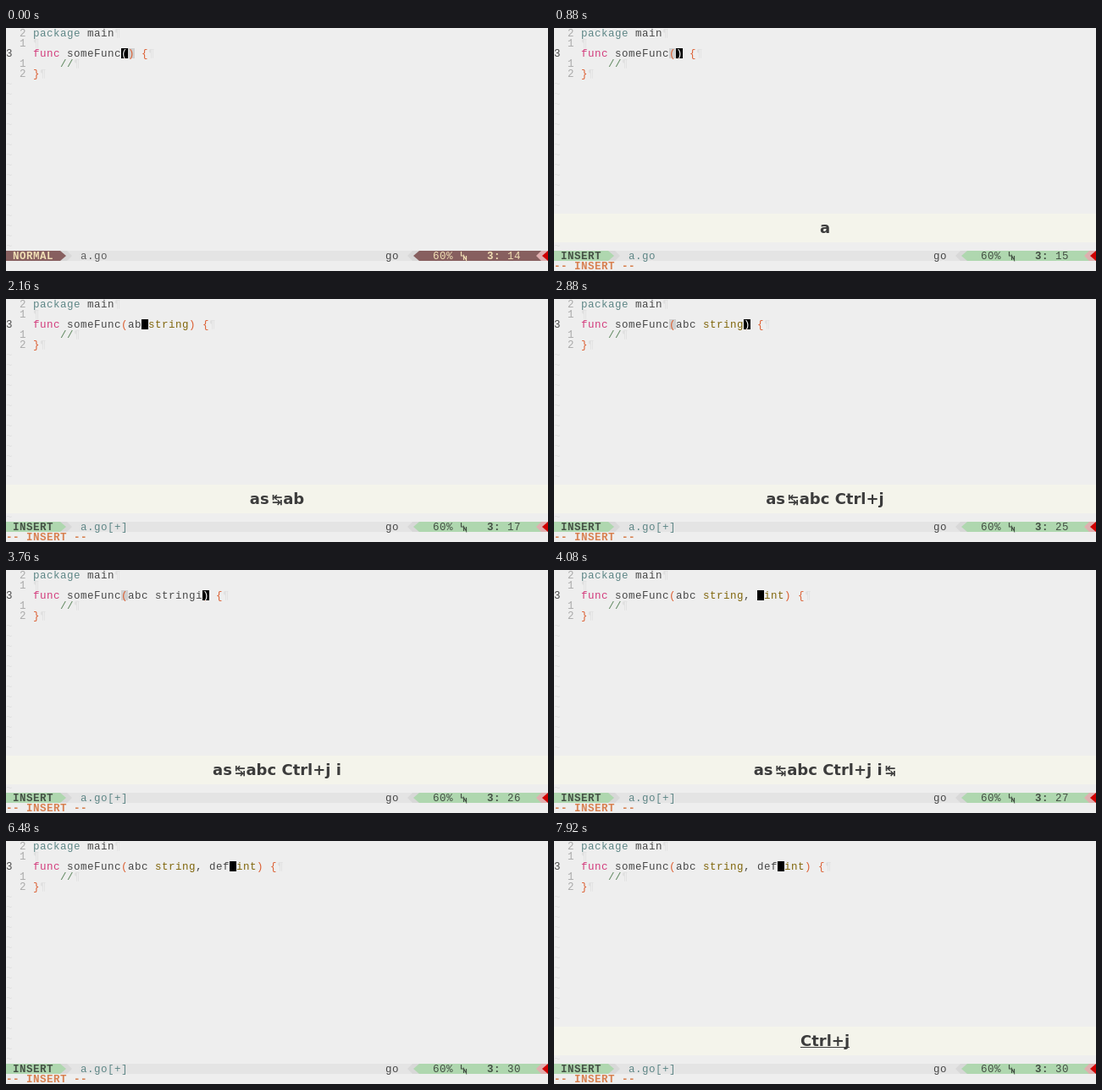
Recreate the animation shown at these times as an HTML page. Size 640 by 288 pixels, loop 8 s.

```html
<!DOCTYPE html>
<html lang="en">
<head>
<meta charset="utf-8">
<title>Go snippets in the editor</title>
<style>
html, body { margin: 0; width: 100%; height: 100%; overflow: hidden; background: #eee; }
#stage { position: relative; width: 640px; height: 288px; overflow: hidden; }
svg { position: absolute; inset: 0; display: block; }
text { font: 12.5px "Liberation Mono", monospace; letter-spacing: .499px; white-space: pre; }
.b { font-weight: bold; }
#keys {
  position: absolute; left: 0; top: 220px; width: 640px; height: 34px;
  background: #f4f4eb; color: #3c3c3c; text-align: center; white-space: pre;
  font: bold 18px/34px "DejaVu Sans", sans-serif;
}
#keys u { text-decoration: underline 1px; text-underline-offset: 1px; text-decoration-skip-ink: none; }
#keys i { font-style: normal; font-size: 15px; line-height: 1; padding: 0 1px 0 3px; }
</style>
</head>
<body>
<div id="stage">
  <svg id="screen" width="640" height="288" viewBox="0 0 640 288"></svg>
  <div id="keys"></div>
</div>
<script>
const LOOP = 8000, CW = 8, CH = 12, LEFT = 32;

// time, arguments, cursor column, mode (N normal, I insert, - insert without message), keys ("|" starts the underline)
const steps = [
  [0, '', 14, 'N', ''],
  [720, '', 15, 'I', '|a'],
  [880, '', 15, 'I', 'a'],
  [1280, 's', 16, 'I', 'a|s'],
  [1440, 's', 16, 'I', 'as'],
  [1520, ' string', 15, '-', 'as|↹'],
  [1600, ' string', 15, 'I', 'as↹'],
  [1840, 'a string', 16, 'I', 'as↹|a'],
  [2000, 'ab string', 17, 'I', 'as↹a|b'],
  [2160, 'ab string', 17, 'I', 'as↹ab'],
  [2240, 'abc string', 18, 'I', 'as↹ab|c'],
  [2400, 'abc string', 18, 'I', 'as↹abc'],
  [2720, 'abc string', 18, 'I', 'as↹abc |Ctrl+j'],
  [2800, 'abc string', 25, 'I', 'as↹abc |Ctrl+j'],
  [2880, 'abc string', 25, 'I', 'as↹abc Ctrl+j'],
  [3600, 'abc stringi', 26, 'I', 'as↹abc Ctrl+j |i'],
  [3760, 'abc stringi', 26, 'I', 'as↹abc Ctrl+j i'],
  [3840, 'abc stringi', 26, '-', 'as↹abc Ctrl+j i|↹'],
  [3920, 'abc string,  int', 27, '-', 'as↹abc Ctrl+j i|↹'],
  [4000, 'abc string,  int', 27, 'I', 'as↹abc Ctrl+j i|↹'],
  [4080, 'abc string,  int', 27, 'I', 'as↹abc Ctrl+j i↹'],
  [4240, 'abc string, d int', 28, 'I', 'as↹abc Ctrl+j i↹|d'],
  [4400, 'abc string, de int', 29, 'I', 'as↹abc Ctrl+j i↹d|e'],
  [4480, 'abc string, def int', 30, 'I', 'as↹abc Ctrl+j i↹de|f'],
  [4640, 'abc string, def int', 30, 'I', 'as↹abc Ctrl+j i↹def'],
  [6480, 'abc string, def int', 30, 'I', ''],
  [7920, 'abc string, def int', 30, 'I', '|Ctrl+j']
];

const C = {
  text: '#484848', keyword: '#d33d7d', pkg: '#5f8787', type: '#80660c', brace: '#dc5f32',
  comment: '#5f875f', num: '#aaa', faint: '#e0e0e0', match: '#d0d0d0', bar: '#e4e4e4', sep: '#d8d8d8'
};
const themes = {
  N: { bg: '#875f5f', fg: '#f0deb4', file: '#5f5f5f' },
  I: { bg: '#afd7af', fg: '#445044', file: '#5f8787' }
};

const screen = document.getElementById('screen');
const keyBand = document.getElementById('keys');

const rect = (x, y, w, h, fill) => `<rect x="${x}" y="${y}" width="${w}" height="${h}" fill="${fill}"/>`;
const cell = (col, fill) => rect(LEFT + (col - 1) * CW, 2 * CH, CW, CH, fill);
const span = ([s, fill]) => `<tspan fill="${fill}">${s}</tspan>`;
const text = (x, row, parts, cls = '') =>
  `<text class="${cls}" x="${x}" y="${row * CH + 10}">${parts.map(span).join('')}</text>`;
const arrow = (base, tip, fill) => `<path d="M${base} 264L${tip} 270L${base} 276z" fill="${fill}"/>`;
const eol = ['¶', C.faint];

function codeRows(args, col) {
  const line = `func someFunc(${args}) {`;
  const close = 15 + args.length;
  const words = args.split(/\b(string|int)\b/).map((s, i) => [s, i % 2 ? C.type : C.text]);
  let out = '';
  if ([14, 15, close].includes(col)) out += cell(14, C.match) + cell(close, C.match);
  out += text(16, 0, [['2', C.num]]) + text(16, 1, [['1', C.num]]) + text(0, 2, [['3', '#505050']]);
  out += text(16, 3, [['1', C.num]]) + text(16, 4, [['2', C.num]]);
  out += text(LEFT, 0, [['package', C.pkg], [' main', C.text], eol]) + text(LEFT, 1, [eol]);
  out += text(LEFT, 2, [['func', C.keyword], [' someFunc', C.text], ['(', C.brace],
    ...words, [') {', C.brace], eol]);
  out += text(LEFT, 3, [['    //', C.comment], eol]) + text(LEFT, 4, [['}', C.brace], eol]);
  for (let row = 5; row < 22; row++) out += text(0, row, [['~', C.faint]]);
  return out + cell(col, '#000') + text(LEFT + (col - 1) * CW, 2, [[line[col - 1], '#fff']]);
}

function statusRow(args, col, mode) {
  const normal = mode === 'N';
  const { bg, fg, file } = themes[normal ? 'N' : 'I'];
  let out = rect(0, 264, 640, 12, C.bar);
  out += rect(64, 264, 8, 12, C.sep) + arrow(72, 78, C.sep) + rect(0, 264, 64, 12, bg) + arrow(64, 71, bg);
  out += rect(480, 264, 8, 12, C.sep) + arrow(480, 474, C.sep) + rect(488, 264, 144, 12, bg) + arrow(488, 481, bg);
  out += rect(632, 264, 8, 12, '#dfafaf') + arrow(632, 626, '#dfafaf') + arrow(640, 633, '#d00000');
  out += text(8, 22, [[normal ? 'NORMAL' : 'INSERT', fg]], 'b');
  out += text(88, 22, [[args ? 'a.go[+]' : 'a.go', file]]);
  out += text(448, 22, [['go', C.text]]) + text(504, 22, [['60%', fg]]);
  out += `<path d="M537.5 265v5h3M540.5 275v-5l3 5v-5" fill="none" stroke="${fg}" stroke-width="1.2"/>`;
  out += text(568, 22, [['3:', fg]], 'b') + text(592, 22, [[col, fg]]);
  if (mode === 'I') out += text(0, 23, [['-- INSERT --', '#d7804f']], 'b');
  return out;
}

function draw([, args, col, mode, keys]) {
  screen.innerHTML = codeRows(args, col) + statusRow(args, col, mode);
  const [done, last] = keys.split('|');
  keyBand.hidden = !keys;
  keyBand.innerHTML = (done + (last ? `<u>${last}</u>` : '')).replace(/↹/g, '<i>↹</i>');
}

let shown;
function tick() {
  const t = performance.now() % LOOP;
  const step = steps.findLast(s => s[0] <= t);
  if (step !== shown) draw(shown = step);
  requestAnimationFrame(tick);
}
tick();
</script>
</body>
</html>
```
